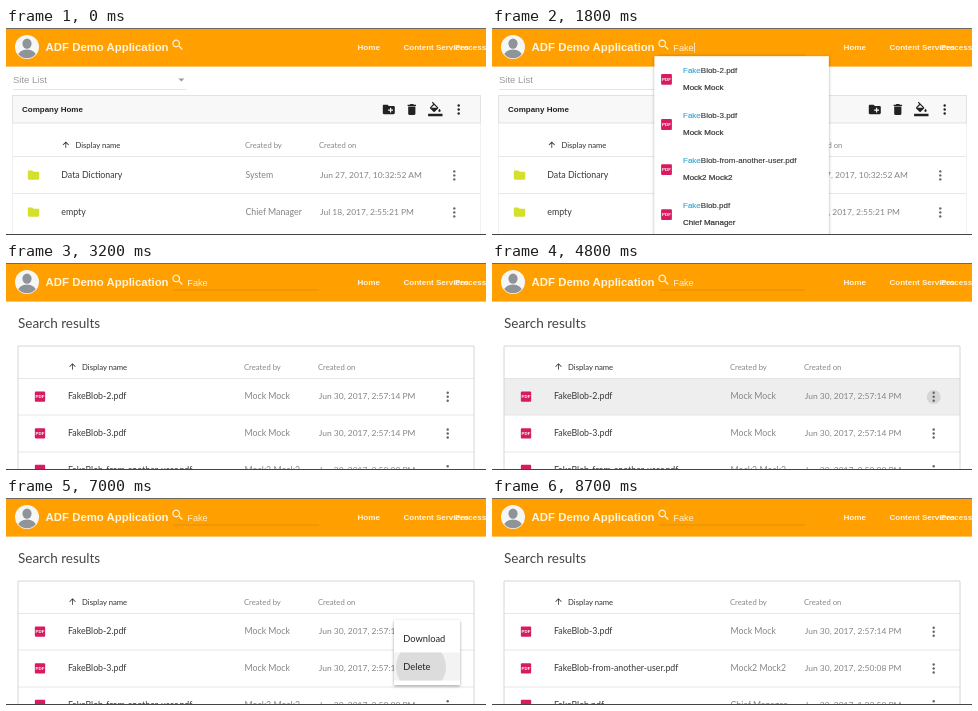
An HTML page for the animation above (8800 ms loop, 480 by 207 pixels).

```html
<!DOCTYPE html>
<html lang="en">
<head>
<meta charset="utf-8">
<title>Document search demo</title>
<style>
html, body { margin: 0; width: 100%; height: 100%; overflow: hidden; background: #fff; }
svg { display: block; width: 100vw; height: 100vh; }
text { white-space: pre; }
.arial { font-family: "Liberation Sans", Arial, sans-serif; }
.lato { font-family: Lato, sans-serif; }
</style>
</head>
<body>
<svg id="stage" viewBox="0 0 480 207" preserveAspectRatio="none"></svg>
<script>
const LOOP = 8800;
const NS = "http://www.w3.org/2000/svg";
const stage = document.getElementById("stage");

const ICONS = {
  search: "M15.5 14h-.79l-.28-.27C15.41 12.59 16 11.11 16 9.5 16 5.91 13.09 3 9.5 3S3 5.91 3 9.5 5.91 16 9.5 16c1.61 0 3.09-.59 4.23-1.57l.27.28v.79l5 4.99L20.49 19zm-6 0C7.01 14 5 11.99 5 9.5S7.01 5 9.5 5 14 7.01 14 9.5 11.99 14 9.5 14z",
  folder: "M10 4H4c-1.1 0-2 .9-2 2v12c0 1.1.9 2 2 2h16c1.1 0 2-.9 2-2V8c0-1.1-.9-2-2-2h-8z",
  addFolder: "M10 4H4c-1.1 0-2 .9-2 2v12c0 1.1.9 2 2 2h16c1.1 0 2-.9 2-2V8c0-1.1-.9-2-2-2h-8zM19 14h-3v3h-2v-3h-3v-2h3V9h2v3h3z",
  trash: "M6 19c0 1.1.9 2 2 2h8c1.1 0 2-.9 2-2V7H6zM19 4h-3.5l-1-1h-5l-1 1H5v2h14z",
  fill: "M16.56 8.94L7.62 0 6.21 1.41l2.38 2.38-5.15 5.15c-.59.59-.59 1.54 0 2.12l5.5 5.5c.6.6 1.5.6 2.12 0l5.5-5.5c.59-.58.59-1.53 0-2.12zM5.21 10L10 5.21 14.79 10zM19 11.5s-2 2.17-2 3.5c0 1.1.9 2 2 2s2-.9 2-2c0-1.33-2-3.5-2-3.5zM0 20h24v4H0z",
  up: "M4 12l1.41 1.41L11 7.83V20h2V7.83l5.58 5.59L20 12l-8-8z"
};

function el(parent, tag, attrs = {}) {
  const node = document.createElementNS(NS, tag);
  for (const key in attrs) node.setAttribute(key, attrs[key]);
  return parent.appendChild(node);
}
const group = (parent, attrs) => el(parent, "g", attrs);
const rect = (parent, x, y, width, height, fill, more = {}) =>
  el(parent, "rect", { x, y, width, height, fill, ...more });
const circle = (parent, cx, cy, r, fill) => el(parent, "circle", { cx, cy, r, fill });
const rule = (parent, x1, x2, y, stroke = "#e0e0e0") =>
  el(parent, "line", { x1, x2, y1: y, y2: y, stroke, "stroke-width": .8 });

function label(parent, str, x, y, size, fill, font = "lato", more = {}) {
  const node = el(parent, "text", { x, y, "font-size": size, fill, class: font, ...more });
  node.textContent = str;
  return node;
}
function icon(parent, name, cx, cy, fill, scale = .6) {
  return el(parent, "path", {
    d: ICONS[name], fill, "fill-rule": "evenodd",
    transform: `translate(${cx} ${cy}) scale(${scale}) translate(-12 -12)`
  });
}
function dots(parent, cx, cy, fill = "#666") {
  for (const dy of [-4, 0, 4]) circle(parent, cx, cy + dy, 1.2, fill);
}
function pdfIcon(parent, cx, cy, size = 10.3) {
  rect(parent, cx - size / 2, cy - size / 2, size, size, "#d81b60", { rx: 1 });
  label(parent, "PDF", cx, cy + 1.6, 4.4, "#fff", "arial", { "text-anchor": "middle", "font-weight": 700 });
}
function tableHead(parent, x, y, byX, onX) {
  icon(parent, "up", x, y - 3, "#333", .4);
  label(parent, "Display name", x + 9.6, y, 7.7, "#333");
  label(parent, "Created by", byX, y, 7.7, "#888");
  label(parent, "Created on", onX, y, 7.7, "#888");
}
function tableRow(parent, y, cells, xs) {
  label(parent, cells[0], xs[0], y, 8.8, "#383838");
  label(parent, cells[1], xs[1], y, 8.75, "#858585");
  label(parent, cells[2], xs[2], y, 8.48, "#858585");
  dots(parent, xs[3], y - 2.4);
}

const defs = el(stage, "defs");
const blur = el(defs, "filter", { id: "shadow", x: "-20%", y: "-20%", width: "140%", height: "140%" });
el(blur, "feDropShadow", { dx: 0, dy: 1.2, stdDeviation: 1.6, "flood-color": "#000", "flood-opacity": .36 });
circle(el(defs, "clipPath", { id: "face" }), 21, 19, 11.2);
rect(el(defs, "clipPath", { id: "deleteItem" }), 388, 154.5, 66, 28);

rect(stage, 0, 0, 480, 207, "#fff");

// Company home
const home = group(stage);
label(home, "Site List", 7, 55, 9.5, "#9a9a9a", "arial");
rule(home, 7, 180.5, 61.5, "#ddd");
el(home, "path", { d: "M172.4 50.5h6l-3 3z", fill: "#999" });
rect(home, 6.5, 67.5, 468, 27.5, "#f8f8f8", { stroke: "#ddd", "stroke-width": .8 });
label(home, "Company Home", 16, 83.6, 8, "#222", "arial", { "font-weight": 700 });
icon(home, "addFolder", 382.8, 81.5, "#222");
icon(home, "trash", 405.8, 81.5, "#222");
icon(home, "fill", 429.3, 81, "#222");
dots(home, 452.7, 81.5, "#222");
tableHead(home, 59.8, 119.8, 239, 313);
[["Data Dictionary", "System", "Jun 27, 2017, 10:32:52 AM"],
 ["empty", "Chief Manager", "Jul 18, 2017, 2:55:21 PM"]].forEach((cells, i) => {
  const y = 149.8 + 37 * i;
  rule(home, 6.5, 474.5, y - 21.3);
  icon(home, "folder", 27.5, y - 2.7, "#d4e02c", .57);
  tableRow(home, y, cells, [55.3, 239.5, 314, 448.3]);
});
el(home, "path", { d: "M6.5 95V207M474.5 95V207", stroke: "#eee", "stroke-width": .8 });

// Search results
const FILES = [
  ["FakeBlob-2.pdf", "Mock Mock", "Jun 30, 2017, 2:57:14 PM"],
  ["FakeBlob-3.pdf", "Mock Mock", "Jun 30, 2017, 2:57:14 PM"],
  ["FakeBlob-from-another-user.pdf", "Mock2 Mock2", "Jun 30, 2017, 2:50:08 PM"],
  ["FakeBlob.pdf", "Chief Manager", "Jun 30, 2017, 1:22:58 PM"]
];
const results = group(stage);
label(results, "Search results", 12, 64.6, 13.5, "#444");
const rowHover = rect(results, 12, 115.5, 456, 36.5, "#eee");
const ripple = circle(results, 441.7, 134, 7, "#d6d6d6");
tableHead(results, 66.5, 106.5, 238, 312);
function fileList(files) {
  const list = group(results);
  files.forEach((cells, i) => {
    const y = 136.2 + 36.7 * i;
    pdfIcon(list, 34, y - 2.6);
    tableRow(list, y, cells, [62, 238.5, 312.8, 441.7]);
  });
  return list;
}
const before = fileList(FILES.slice(0, 3));
const after = fileList(FILES.slice(1));
for (const y of [115.5, 152, 189]) rule(results, 12, 468, y);
el(results, "path", { d: "M12 207V83H468V207", fill: "none", stroke: "#d2d2d2", "stroke-width": .9 });

// Row menu
const menu = group(results);
rect(menu, 388, 122, 66, 65, "#fff", { rx: 1, filter: "url(#shadow)" });
const deleteHover = rect(menu, 388, 154.5, 66, 28, "#f3f3f3");
const deleteRipple = el(menu, "circle", { cx: 415, cy: 169, fill: "#dcdcdc", "clip-path": "url(#deleteItem)" });
["Download", "Delete"].forEach((str, i) =>
  label(menu, str, 397.3, 144 + 27.6 * i, 9.3, "#222"));

// Header
const header = group(stage);
rect(header, 0, 0, 480, 38.6, "#ff9f00");
rect(header, 0, 0, 480, 1, "#6e6a62");
circle(header, 21, 19, 12, "#f6f6f6");
const face = group(header, { fill: "#8f9499", "clip-path": "url(#face)" });
el(face, "ellipse", { cx: 21, cy: 15.6, rx: 4.6, ry: 5.2 });
el(face, "ellipse", { cx: 21, cy: 28.2, rx: 9.2, ry: 6.8 });
const NAV = { "font-weight": 700 };
label(header, "ADF Demo Application", 39.6, 23.4, 11.4, "#fff4dc", "arial", NAV);
label(header, "Home", 351.5, 21.8, 8.1, "#fff4dc", "arial", NAV);
label(header, "Content Services", 397.5, 21.8, 8, "#fff4dc", "arial", NAV);
label(header, "Process", 449, 21.8, 8, "#fff4dc", "arial", NAV);
icon(header, "search", 171.7, 16.9, "#fff4dc");
const underline = rule(header, 167, 313, 27, "#d98c10");
const query = label(header, "", 181.3, 22.8, 9.2, "#ffefcf", "arial");
const caret = rect(header, 181.5, 14.5, .7, 10, "#fff");

// Suggestions
const panel = group(stage);
rect(panel, 162.4, 28.2, 174.4, 190, "#fff", { filter: "url(#shadow)" });
FILES.forEach(([name, owner], i) => {
  const y = 44.5 + 45.1 * i;
  const title = label(panel, "", 191, y, 8, "#333", "arial", { stroke: "#333", "stroke-width": .12 });
  const mark = el(title, "tspan", { fill: "#2fa4d0", stroke: "#2fa4d0" });
  mark.textContent = "Fake";
  title.append(name.slice(4));
  label(panel, owner, 191, y + 17.6, 8, "#333", "arial", { stroke: "#333", "stroke-width": .2 });
  pdfIcon(panel, 174.5, y + 6.9, 10.8);
});

rect(stage, 0, 206, 480, 1, "#444");

const clamp = v => Math.max(0, Math.min(1, v));
const ramp = (t, start, end) => clamp((t - start) / (end - start));
const easeOut = v => 1 - (1 - v) ** 3;
const show = (node, on) => node.setAttribute("display", on ? "inline" : "none");
const fade = (node, v) => node.setAttribute("opacity", v);

function draw(now) {
  const t = Math.floor((now % LOOP) / 100) * 100;
  const found = t >= 2100;
  const deleted = t >= 8000;

  show(home, !found);
  show(results, found);
  show(before, !deleted);
  show(after, deleted);

  const typed = Math.round(clamp((t - 900) / 400) * 4);
  query.textContent = "Fake".slice(0, typed);
  const widths = [0, 5.6, 10.7, 15.3, 20.4];
  caret.setAttribute("x", 181.6 + widths[typed]);
  show(caret, t >= 500 && !found);
  underline.setAttribute("x2", 167 + 146 * easeOut(ramp(t, 0, 500)));
  show(underline, t >= 100);

  show(panel, t >= 1400 && !found);
  fade(panel, ramp(t, 1300, 1600));

  fade(rowHover, ramp(t, 4400, 4600) * (1 - ramp(t, 5400, 5600)));
  ripple.setAttribute("r", 7 * easeOut(ramp(t, 4500, 4800)));
  fade(ripple, 1 - ramp(t, 4900, 5200));

  const open = easeOut(ramp(t, 4900, 5200));
  show(menu, t >= 5000 && t < 7500);
  fade(menu, open * (1 - ramp(t, 7200, 7500)));
  const s = .6 + .4 * open;
  menu.setAttribute("transform", `translate(454 122) scale(${s}) translate(-454 -122)`);
  show(deleteHover, t >= 6100);
  show(deleteRipple, t >= 6900);
  deleteRipple.setAttribute("r", 12 + 13 * ramp(t, 6900, 7000) + 25 * easeOut(ramp(t, 7000, 7300)));
}

const start = performance.now();
function tick() {
  draw(performance.now() - start);
  requestAnimationFrame(tick);
}
draw(0);
requestAnimationFrame(tick);
</script>
</body>
</html>
```
